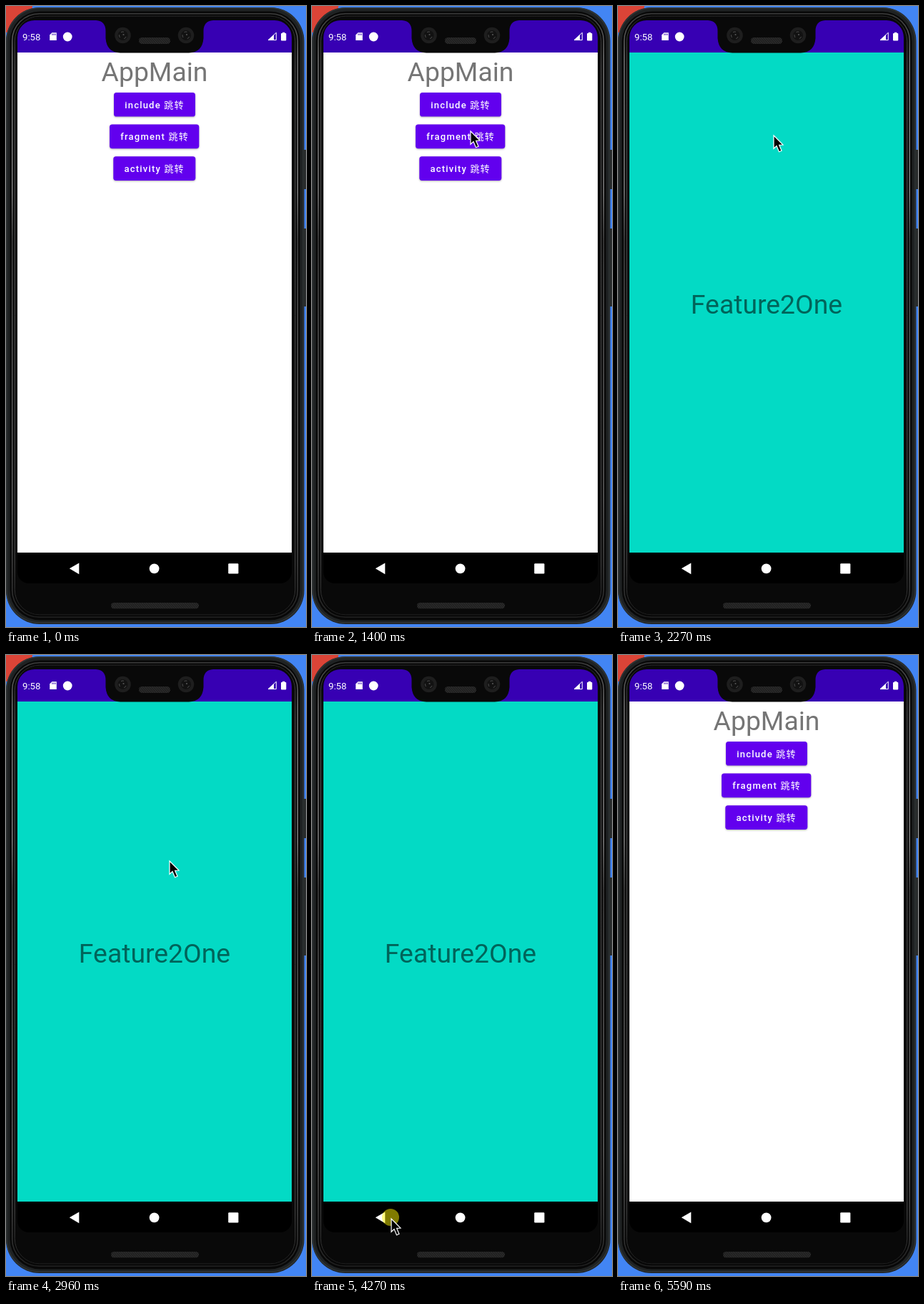
An HTML page with a canvas that plays this animation: 420 by 868 pixels, repeating every 5740 ms.

```html
<!DOCTYPE html>
<html lang="en">
<head>
<meta charset="utf-8">
<title>Phone navigation</title>
<style>
  html, body { margin: 0; width: 100%; height: 100%; overflow: hidden; background: #4285f4; }
  canvas { display: block; width: 420px; height: 868px; }
</style>
</head>
<body>
<canvas id="stage" width="420" height="868"></canvas>
<script>
const ctx = document.getElementById('stage').getContext('2d');
const LOOP = 5740;
const FONT = 'Roboto, "Noto Sans CJK SC", "Noto Sans CJK JP", "Noto Sans CJK", sans-serif';

const BUTTONS = [
  { label: 'include 跳转', x: 151, y: 121, w: 114 },
  { label: 'fragment 跳转', x: 145, y: 165.6, w: 125.3 },
  { label: 'activity 跳转', x: 150.3, y: 210.3, w: 115 }
];
const BUTTON_H = 33.6;

// Pointer moves: each runs along a quadratic curve in held steps.
const MOVES = [
  { start: 640, end: 1170, steps: 8, path: [[322, 855], [262, 240], [224, 199]] },
  { start: 1400, end: 1630, steps: 4, path: [[221, 173], [219, 174], [217, 179]] },
  { start: 2730, end: 2960, steps: 4, path: [[217, 181], [219, 200], [228, 286]] },
  { start: 3050, end: 3280, steps: 4, path: [[227, 400], [205, 620], [165, 714]] },
  { start: 3350, end: 3580, steps: 4, path: [[170, 703], [190, 650], [196, 640]] },
  { start: 3660, end: 3890, steps: 4, path: [[192, 655], [172, 750], [149, 771]] },
  { start: 3970, end: 4120, steps: 3, path: [[139, 776], [122, 785], [110, 786]] },
  { start: 4440, end: 4980, steps: 8, path: [[110, 786], [230, 760], [322, 855]] },
  { start: 5060, end: 5130, steps: 2, path: [[324, 862], [324, 862], [324, 890]] }
];

const within = (t, from, to) => t >= from && t < to;

function roundRect(x, y, w, h, r) {
  ctx.beginPath();
  ctx.roundRect(x, y, w, h, r);
}

function fillRound(x, y, w, h, r, color) {
  roundRect(x, y, w, h, r);
  ctx.fillStyle = color;
  ctx.fill();
}

function disc(x, y, r, color) {
  ctx.beginPath();
  ctx.arc(x, y, r, 0, Math.PI * 2);
  ctx.fillStyle = color;
  ctx.fill();
}

function polygon(points, color) {
  ctx.beginPath();
  points.forEach(([x, y]) => ctx.lineTo(x, y));
  ctx.closePath();
  if (color) {
    ctx.fillStyle = color;
    ctx.fill();
  }
}

function text(label, x, y, size, color, { weight = 400, align = 'left', spacing = 0 } = {}) {
  ctx.font = `${weight} ${size}px ${FONT}`;
  ctx.textAlign = align;
  ctx.letterSpacing = `${spacing}px`;
  ctx.fillStyle = color;
  ctx.fillText(label, x, y);
}

function verticalGradient(stops) {
  const g = ctx.createLinearGradient(0, 2, 0, 864);
  stops.forEach(([at, color]) => g.addColorStop(at, color));
  return g;
}

function frameLine(inset, width, radius, style) {
  roundRect(inset, 2 + inset, 417 - 2 * inset, 861 - 2 * inset, radius);
  ctx.lineWidth = width;
  ctx.strokeStyle = style;
  ctx.stroke();
}

function drawBody() {
  ctx.fillStyle = '#4285f4';
  ctx.fillRect(0, 0, 420, 868);
  disc(0, 0, 37, '#db4437');

  ctx.fillStyle = '#2b2e2f';
  ctx.fillRect(416, 201, 4, 55);
  ctx.fillRect(416, 311, 4, 109);

  fillRound(0, 2, 417.5, 862, 47, '#1f2223');
  frameLine(1, 1.5, 46, '#303536');
  fillRound(5.5, 7.5, 406, 851, 42, '#080808');
  const shine = verticalGradient([
    [0, '#333'], [0.08, '#777'], [0.3, '#858585'], [0.38, '#454545'],
    [0.5, '#555'], [0.8, '#666'], [0.95, '#333'], [1, '#1c1c1c']
  ]);
  frameLine(8.7, 1.4, 38, shine);
  frameLine(12.2, 0.9, 35, verticalGradient([[0, '#222'], [0.1, '#666'], [0.9, '#555'], [1, '#181818']]));
  fillRound(13.5, 15, 390, 835, 33, '#090909');
}

function grille(x, y, w, h) {
  ctx.save();
  roundRect(x, y, w, h, h / 2);
  ctx.clip();
  ctx.fillStyle = '#161616';
  ctx.fillRect(x, y, w, h);
  ctx.beginPath();
  for (let i = x - h; i < x + w; i += 2.5) {
    ctx.moveTo(i, y + h);
    ctx.lineTo(i + h * 0.7, y);
  }
  ctx.strokeStyle = '#3b3b3b';
  ctx.lineWidth = 1;
  ctx.stroke();
  ctx.restore();
}

function lens(x) {
  disc(x, 41, 11.3, '#1e1e1e');
  disc(x, 41, 7, '#121212');
  ctx.strokeStyle = '#505050';
  ctx.lineWidth = 1;
  for (const angle of [0.4, 2.5, 4.2]) {
    ctx.beginPath();
    ctx.arc(x, 41, 5, angle, angle + 0.8);
    ctx.stroke();
  }
  disc(x + 1, 40, 1.1, '#555');
}

function drawNotch() {
  ctx.beginPath();
  ctx.moveTo(126, 19);
  ctx.lineTo(126, 20);
  ctx.quadraticCurveTo(139.5, 21, 139.5, 35);
  ctx.lineTo(139.5, 45);
  ctx.quadraticCurveTo(141, 65, 160, 65.5);
  ctx.lineTo(256, 65.5);
  ctx.quadraticCurveTo(275, 65, 276.5, 45);
  ctx.lineTo(276.5, 35);
  ctx.quadraticCurveTo(276.5, 21, 290, 20);
  ctx.lineTo(290, 19);
  ctx.closePath();
  ctx.fillStyle = '#090909';
  ctx.fill();
  lens(163.5);
  lens(252);
  grille(186, 44, 44, 9);
}

function drawStatusBar() {
  ctx.fillStyle = '#3700b3';
  ctx.fillRect(16, 20, 384, 45.5);
  text('9:58', 23, 48, 13.2, '#fff');

  polygon([[64.3, 37.3], [70.8, 37.3], [70.8, 48], [61.2, 48], [61.2, 40.5]], '#fff');
  ctx.fillStyle = '#3700b3';
  [64.4, 66.5, 68.6].forEach(x => ctx.fillRect(x, 38.6, 1, 2.2));
  disc(86.2, 43, 6.4, '#fff');

  polygon([[367, 47.6], [378.3, 47.6], [378.3, 37.3]]);
  ctx.strokeStyle = '#fff';
  ctx.lineWidth = 1;
  ctx.stroke();
  polygon([[367, 47.6], [375, 47.6], [375, 40.3]], '#fff');

  fillRound(385, 38, 7.3, 10.5, 1, '#fff');
  ctx.fillRect(387, 36.8, 3.4, 2);
}

function drawButton({ label, x, y, w }) {
  ctx.save();
  ctx.shadowColor = 'rgba(0,0,0,.3)';
  ctx.shadowBlur = 2.5;
  ctx.shadowOffsetY = 1;
  fillRound(x, y, w, BUTTON_H, 3.7, '#6200ee');
  ctx.restore();
}

function drawHome(t) {
  ctx.fillStyle = '#fff';
  ctx.fillRect(16, 65, 384, 699);
  text('AppMain', 208, 105.3, 37.33, '#757575', { align: 'center' });
  BUTTONS.forEach(drawButton);
  if (within(t, 2180, 2270)) {
    const b = BUTTONS[1];
    ctx.save();
    roundRect(b.x, b.y, b.w, BUTTON_H, 3.7);
    ctx.clip();
    disc(217, 182, 70.5, 'rgba(255,255,255,.19)');
    ctx.restore();
  }
  BUTTONS.forEach(b => text(b.label, b.x + 15.2, b.y + 21.6, 13.07, '#fff', { weight: 500, spacing: 1.167 }));
}

function drawFeature() {
  ctx.fillStyle = '#03dac5';
  ctx.fillRect(16, 65, 384, 699);
  text('Feature2One', 208, 430, 37.33, 'rgba(0,0,0,.54)', { align: 'center' });
}

function drawNavBar(t) {
  if (within(t, 4440, 4830)) {
    const fade = 1 - (t - 4440) / 390;
    fillRound(59, 764, 75.5, 45, 22.5, `rgba(255,255,255,${0.2 * fade})`);
  }
  polygon([[88.8, 786.3], [102.3, 778.6], [102.3, 794.2]], '#fff');
  disc(207.6, 786.4, 6.9, '#fff');
  fillRound(311.2, 779.3, 14.2, 14.2, 1.2, '#fff');
}

function drawScreen(t) {
  ctx.save();
  roundRect(16, 20, 384, 787, [24, 24, 16, 16]);
  ctx.clip();
  ctx.fillStyle = '#000';
  ctx.fillRect(16, 20, 384, 787);
  drawStatusBar();
  if (within(t, 2270, 4440)) drawFeature();
  else drawHome(t);
  ctx.restore();
  drawNavBar(t);
}

function pointerAt(t) {
  const move = MOVES.filter(m => m.start <= t).pop();
  const last = move.steps - 1;
  const step = Math.min(last, Math.floor((t - move.start) / (move.end - move.start) * last + 0.1));
  const u = step / last;
  const [from, via, to] = move.path;
  return [0, 1].map(i => Math.round((1 - u) ** 2 * from[i] + 2 * u * (1 - u) * via[i] + u * u * to[i]));
}

function drawPointer(t) {
  if (!within(t, 640, 5130)) return;
  const [x, y] = pointerAt(t);
  if (within(t, 1800, 1950) || within(t, 4270, 4440)) disc(x, y, 12, 'rgba(255,245,0,.5)');
  ctx.save();
  ctx.translate(x, y);
  polygon([[1, 2], [1, 20.3], [5, 16.6], [8.5, 24.8], [12, 23.3], [8.6, 15.3], [14, 15]], '#000');
  ctx.strokeStyle = '#fff';
  ctx.lineWidth = 1.2;
  ctx.stroke();
  ctx.restore();
}

function draw(now) {
  const t = now % LOOP;
  ctx.clearRect(0, 0, 420, 868);
  drawBody();
  drawScreen(t);
  drawNotch();
  grille(147, 834, 123, 8.5);
  drawPointer(t);
}

let origin;
function tick(now) {
  origin ??= now;
  draw(now - origin);
  requestAnimationFrame(tick);
}
requestAnimationFrame(tick);
</script>
</body>
</html>
```
